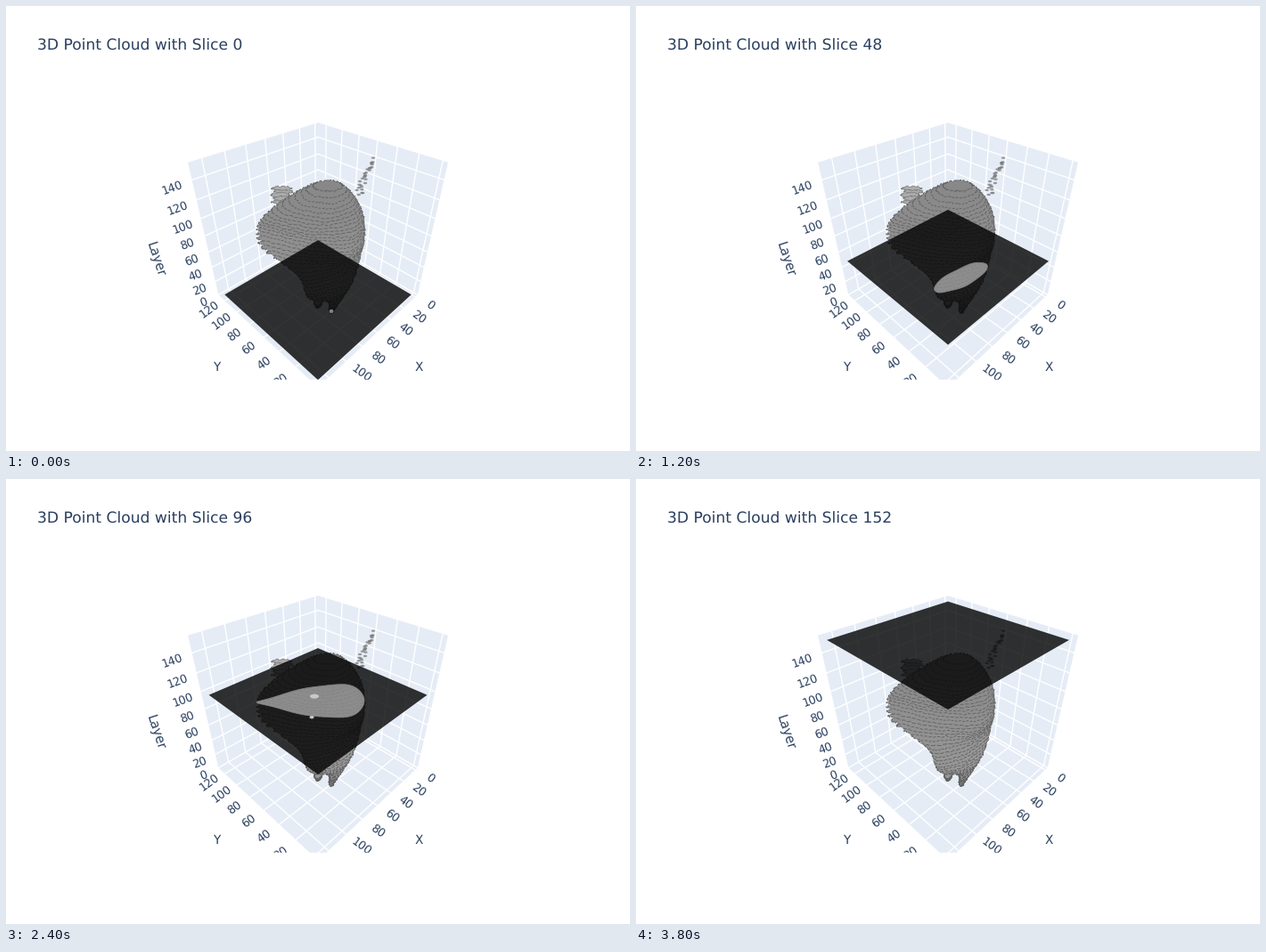
Animation of 700 by 500 pixels, one loop 3.9 s. Source, as a matplotlib script:

```python
import numpy as np
import matplotlib.pyplot as plt
from matplotlib.animation import FuncAnimation
from matplotlib.patches import Ellipse, PathPatch, Polygon, Rectangle
from matplotlib.path import Path

W, H, DPI = 700, 500, 100
STEP, FRAMES = 4, 39
LAYERS = 156
TOP = 142
INK = "#2a3f5f"
PANEL = "#e5ecf6"
N = 120

plt.rcParams["font.family"] = "DejaVu Sans"
plt.rcParams["text.hinting"] = "none"
fig = plt.figure(figsize=(W / DPI, H / DPI), dpi=DPI, facecolor="white")
ax = fig.add_axes([0, 0, 1, 1])
ax.set_xlim(0, W)
ax.set_ylim(H, 0)
ax.axis("off")
rng = np.random.default_rng(4)
angle = np.linspace(0, 2 * np.pi, N, endpoint=False)


def pt(px):
    return px * 72 / DPI


def grey(v):
    return (v / 255,) * 3


# Perspective camera looking at a unit cube from (1.25, 1.25, 1.25)
def depth(x, y, z):
    return 1.25 * 3 ** 0.5 - (x + y + z) / 3 ** 0.5


def project(x, y, z):
    k = 160 / np.tan(np.pi / 8) / depth(x, y, z)
    return (350 + k * (y - x) / 2 ** 0.5,
            260 - k * (2 * z - x - y) / 6 ** 0.5)


def side(v):
    return (v + 4) / 135 - 0.5


def height(layer):
    return layer / LAYERS - 0.5


def label(x, y, s, size=12.6, **kw):
    ax.text(x, y, s, fontsize=pt(size), color=INK, ha="center", va="center", **kw)


def line(a, b):
    (x0, y0), (x1, y1) = project(*a), project(*b)
    ax.plot([x0, x1], [y0, y1], color="white", lw=pt(1.4), zorder=1)


def draw_box():
    h = 0.5
    square = [(-h, -h), (h, -h), (h, h), (-h, h)]
    for axis in range(3):
        wall = [project(*np.insert(c, axis, -h)) for c in square]
        ax.add_patch(Polygon(wall, fc=PANEL, ec=PANEL, lw=0.4, zorder=0))
    for v in range(0, 121, 20):
        x, y = side(v), -side(v)
        line((x, -h, -h), (x, -h, h))
        line((x, -h, -h), (x, h, -h))
        line((-h, y, -h), (-h, y, h))
        line((-h, y, -h), (h, y, -h))
        for p, sign in (((x, h, -h), 1), ((h, y, -h), -1)):
            px, py = project(*p)
            label(px + sign * 17.3, py + 58 / depth(*p) ** 2, str(v),
                  rotation=-sign * 36)
    for v in range(0, 141, 20):
        z = height(v)
        line((-h, -h, z), (h, -h, z))
        line((-h, -h, z), (-h, h, z))
        px, py = project(h, -h, z)
        label(px - 43 / depth(h, -h, z), py + 9.3, str(v), rotation=20)
    label(167, 285, "Layer", 14.5, rotation=-72)
    label(463.5, 406, "X", 13.5)
    label(236, 406, "Y", 13.5)
    ax.add_patch(Rectangle((0, 420), W, 80, color="white", zorder=20))


def ellipse(cx, cy, rx, ry):
    return np.column_stack([cx - rx * np.cos(angle), cy - ry * np.sin(angle)])


# Cut shape at a few layers: left and right end, their y, half-height at each
KNOTS = {
    0: (363, 367, 343, 343, 1.8, 1.8),
    24: (357, 382, 330, 319, 4, 8),
    32: (345, 387, 330, 312, 5, 10),
    64: (323, 399, 297, 274, 14, 15),
    84: (284, 402, 268, 261, 5, 28),
    96: (281, 402, 251, 249, 4, 28),
    112: (291, 400, 235, 234, 11, 22),
    136: (333, 385, 209, 209, 11, 11),
    TOP: (344, 378, 202, 202, 6, 6),
}
LEVELS = np.array(list(KNOTS))
SHAPES = np.array(list(KNOTS.values()), float)
SLOPES = np.gradient(SHAPES, LEVELS, axis=0)


def shape_at(layer):
    """Cubic blend of the key shapes."""
    j = min(np.searchsorted(LEVELS, layer, side="right"), len(LEVELS) - 1)
    gap = LEVELS[j] - LEVELS[j - 1]
    t = (layer - LEVELS[j - 1]) / gap
    s = t * t * (3 - 2 * t)
    return ((1 - s) * SHAPES[j - 1] + s * SHAPES[j]
            + gap * t * (1 - t) * ((1 - t) * SLOPES[j - 1] - t * SLOPES[j]))


def section(layer):
    """Outlines of the solid at one layer, clockwise on the stage."""
    if layer > TOP:
        return []
    left, right, yl, yr, hl, hr = shape_at(layer)
    u = (1 - np.cos(angle)) / 2
    half = (hl + (hr - hl) * u) * (1 + 0.05 * np.sin(5 * angle + layer / 12))
    parts = [np.column_stack([left + (right - left) * u,
                              yl + (yr - yl) * u - half * np.sin(angle)])]
    if 14 <= layer <= 24:
        g = layer - 14
        parts.append(ellipse(350, 337 - 0.5 * g, 2.5 + 0.25 * g, 2 + 0.15 * g))
    return parts


def ragged(curve, amount):
    return curve + amount * rng.normal(size=curve.shape)


def draw_cloud():
    for layer in np.arange(0, TOP + 1, 3.55):
        for curve in section(layer):
            ax.add_patch(Polygon(
                ragged(curve, 0.5), fc=grey(156 - layer * 0.14), ec=grey(100),
                lw=pt(0.9), ls=(rng.uniform(0, 5), (rng.uniform(3, 6), 1.8)),
                zorder=3))
    for y in np.linspace(205, 220, 5):
        flake = ellipse(308 + rng.uniform(-6, 7), y, rng.uniform(7, 11), 2.3)
        ax.add_patch(Polygon(ragged(flake, 0.6)[::3], fc=grey(172), ec=grey(120),
                             lw=pt(0.7), zorder=2.5))


def blob(x, y, w, h, v, **kw):
    return ax.add_patch(Ellipse((x, y), w, h, lw=0, fc=grey(v), **kw))


def closed(points):
    points = np.asarray(points)
    return Path(np.vstack([points, points[:1]]), closed=True)


draw_box()
draw_cloud()

# Loose specks rising along the right-hand side
climb = np.linspace(0, 1, 28)
specks = np.column_stack([396 + 16 * climb + rng.normal(0, 5, 28) * (1 - climb),
                          212 - 40 * climb + rng.normal(0, 1, 28)])
lights = []
for x, y in specks:
    blob(x, y, 4.4, 2.4, 122, alpha=0.75, zorder=3)
    lights.append(blob(x, y, 3, 1.6, 185, zorder=8))

empty = closed(np.zeros((3, 2)))
sheet = ax.add_patch(PathPatch(empty, fc="black", alpha=0.8, lw=0, zorder=5))
cut = ax.add_patch(PathPatch(empty, fc=grey(140), ec=grey(125), alpha=0.8,
                             lw=pt(0.8), zorder=6))
# Two upright vessels and a sideways branch seen in the cuts
trunk = blob(0, 0, 10, 5, 200, zorder=7)
twig = blob(0, 0, 5, 3.5, 190, zorder=7)
branch = ax.add_patch(Polygon(np.zeros((3, 2)), fc=grey(182), lw=0, zorder=7))
title = ax.text(35, 50, "", fontsize=pt(17.1), color=INK, va="baseline")


def draw_vessels(layer, mid):
    trunk.set_center((346, mid + 1.5))
    trunk.set_visible(56 <= layer <= 104)
    twig.set_center((343, mid + 25))
    twig.set_facecolor(grey(np.clip(40 + 5 * (layer - 64), 40, 195)))
    twig.set_visible(60 <= layer <= 104)
    x = np.linspace(320, 387, 40)
    wave = mid + 5 - (x - 320) / 12 + np.sin(x / 5)
    thick = 1.8 * np.sin(np.pi * (x - 320) / 67) * (1.1 + np.sin(x / 3.5))
    thick *= max(0, 1 - ((layer - 112) / 11) ** 2)
    branch.set_xy(np.r_[np.c_[x, wave - thick], np.c_[x, wave + thick][::-1]])
    branch.set_visible(abs(layer - 112) < 11)


def draw(i):
    layer = i * STEP
    z = height(layer)
    a, b = side(0), side(127)
    corners = [project(x, y, z) for x, y in ((a, a), (a, b), (b, b), (b, a))]
    # Reversed outlines leave a hole in the sheet for the cut
    holes = [closed(c[::-1]) for c in section(layer)]
    sheet.set_path(Path.make_compound_path(closed(corners), *holes))
    cut.set_path(Path.make_compound_path(*holes) if holes else empty)
    cut.set_visible(bool(holes))
    draw_vessels(layer, project(0, 0, z)[1])
    for light, (_, y) in zip(lights, specks):
        light.set_visible(abs(136 + (196 - y) * 0.7 - layer) < 0.8)
    title.set_text(f"3D Point Cloud with Slice {layer}")
    return [sheet, cut, trunk, twig, branch, title, *lights]


anim = FuncAnimation(fig, draw, frames=FRAMES, interval=100, repeat=True,
                     repeat_delay=0, blit=False)
plt.show()
```
